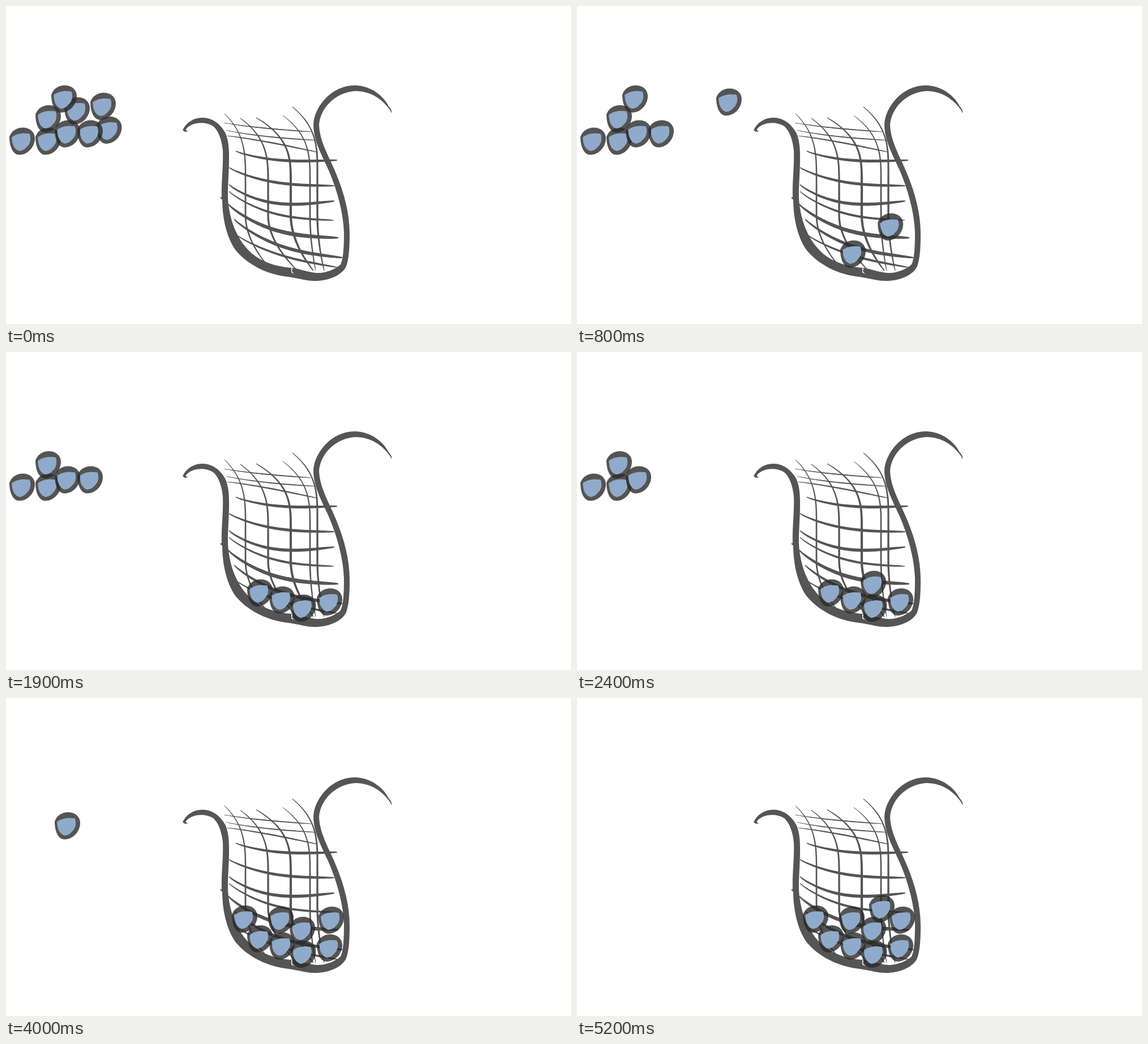
Write an HTML page that moves like this. It is 998 px wide and 561 px high and loops after 7 s.

```html
<!DOCTYPE html>
<html lang="en">
<head>
<meta charset="utf-8">
<title>Balls into a net</title>
<style>
  html, body { margin: 0; width: 100%; height: 100%; overflow: hidden; background: #fff; }
  svg { display: block; width: 100%; height: 100%; }
  #net { fill: #555; }
  .ring { fill: #2a2a2a; fill-opacity: .8; fill-rule: evenodd; }
  .core { fill: #8faacb; }
</style>
</head>
<body>
<svg viewBox="0 0 998 561">
  <defs>
    <g id="ball">
      <path class="core" d="M-18,-7 C-11,-12 -2,-15 13,-13 C17,-3 13,6 8,10 C4,15 -1,17 -5,17 C-13,15 -18,6 -18,-7Z"/>
      <path class="ring" d="M-22.5,-8 C-18,-19 -9,-24 1,-24 C14,-24 22.5,-16 22.5,-5 C22.5,10 10,24 -5,24 C-16,24 -22.5,10 -22.5,-8Z
        M-18,-7 C-11,-12 -2,-15 13,-13 C17,-3 13,6 8,10 C4,15 -1,17 -5,17 C-13,15 -18,6 -18,-7Z"/>
    </g>
  </defs>
  <g id="net">
    <path d="M312,219 C318,206 331,197 347,197 C365,197 379,209 387,223 C393,236 394,250 394,268
      C394,300 390,330 393,350 C397,385 412,420 440,441 C460,455 485,461 508,462
      C522,465 535,470 550,471 C568,471 583,463 591,456 C596,445 597,425 597,400
      C596,365 585,325 570,290 C556,260 543,236 543,209 C544,180 573,140 616,140
      C645,140 668,160 676,177 C680,181 682,185 681,189 L678,183
      C665,165 645,150 617,150 C582,152 555,180 553,210 C554,240 572,268 584,298
      C597,330 607,365 607,402 C607,425 606,445 601,459 C594,475 570,485 545,485
      C530,485 515,480 500,478 C460,474 425,455 405,430 C388,405 382,370 382,342
      L378,338 L381,337 C380,310 384,285 383,255 C381,235 375,220 366,212
      C352,203 330,205 320,215 C316,219 318,220 322,221 L316,222Z"/>
    <path fill="#fff" d="M504,462 L506,463 L505,468 L509,473 L504,470Z"/>
  </g>
  <g id="balls"></g>
</svg>
<script>
const add = (parent, tag, attr, value) => {
  const node = document.createElementNS('http://www.w3.org/2000/svg', tag);
  node.setAttribute(attr, value);
  return document.getElementById(parent).appendChild(node);
};
const mix = (a, b, u) => a + (b - a) * u;
const clamp = u => Math.max(0, Math.min(1, u));

// Inks the curve at(u), u from 0 to 1, with tapered ends.
function brush(width, at) {
  const left = [], right = [], steps = 40;
  for (let n = 0; n <= steps; n++) {
    const u = n / steps;
    const [x, y] = at(u), [ax, ay] = at(clamp(u - .01)), [bx, by] = at(clamp(u + .01));
    const swell = Math.sqrt(Math.max(0, Math.sin(Math.PI * u ** 1.3)));
    const k = width / 2 * mix(.3, 1, swell) / Math.hypot(bx - ax, by - ay);
    const ox = (ay - by) * k, oy = (bx - ax) * k;
    left.push([x + ox, y + oy]);
    right.unshift([x - ox, y - oy]);
  }
  add('net', 'path', 'd', `M${left.concat(right).join('L')}Z`);
}

// A thread hung between two points.
const across = (x0, y0, x1, y1, sag, width) => brush(width, u =>
  [mix(x0, x1, u), mix(y0, y1, u) + sag * Math.sin(Math.PI * u ** .8)]);

// A thread that falls from the rim, runs down the belly and turns to the foot.
const down = (rim, top, belly, foot, width) => brush(width, u => {
  const y = mix(top, 467, u);
  const rise = 1 - (1 - clamp((y - top) / 115)) ** 3.2;
  const turn = clamp((y - 370) / 97) ** 1.9;
  return [mix(rim, belly, rise) + (foot - belly) * turn, y];
});

across(385, 206, 540, 222, 2, 2);
across(388, 219, 548, 237, 3, 2);
across(390, 229, 551, 258, -2, 2.5);
across(406, 256, 585, 272, 9, 5);
across(394, 285, 580, 317, 12, 5);
across(394, 315, 580, 344, 20, 5.5);
across(394, 327, 579, 378, 17, 4);
across(393, 350, 587, 409, 20, 7);
across(403, 376, 594, 444, 18, 6);
across(404, 402, 585, 461, 11, 4);

down(386, 190, 423, 470, 2.8);
down(414, 198, 463, 515, 3.4);
down(442, 197, 503, 543, 4.2);
down(489, 193, 537, 547, 2.8);
down(506, 178, 550, 562, 3.4);

// One throw: x slows down by drag, y is a parabola whose height is set by lift.
function ball(start, hops, x0, y0, x1, y1, lift = 640, drag = 1.8) {
  const node = add('balls', 'use', 'href', '#ball');
  return tick => {
    const u = clamp((tick - start) / hops);
    const x = mix(x0, x1, 1 - (1 - u) ** drag);
    const y = mix(y0, y1, u) - lift * u * (1 - u);
    node.setAttribute('transform', `translate(${x},${y})`);
  };
}

const balls = [
  ball(4, 5, 125.5, 185, 571.5, 441, 0, 2),
  ball(0, 4, 171.5, 177, 487.5, 437.5),
  ball(7, 5, 182, 219, 525, 452, 600, 1.3),
  ball(12, 7, 102.5, 164, 448.5, 425, 585, 3.8),
  ball(20, 4, 148.5, 225.5, 523.5, 410),
  ball(28, 4, 28.5, 238.5, 574.5, 392),
  ball(31, 5, 74.5, 238.5, 421.5, 390),
  ball(35, 5, 74.5, 199, 485.5, 392),
  ball(46, 6, 108.5, 225.5, 538.5, 372)
];

const TICK = 100, LOOP = 7000;
const begin = performance.now();
function draw(now) {
  const tick = Math.floor(Math.max(0, now - begin) % LOOP / TICK);
  balls.forEach(move => move(tick));
  requestAnimationFrame(draw);
}
draw(begin);
</script>
</body>
</html>
```
